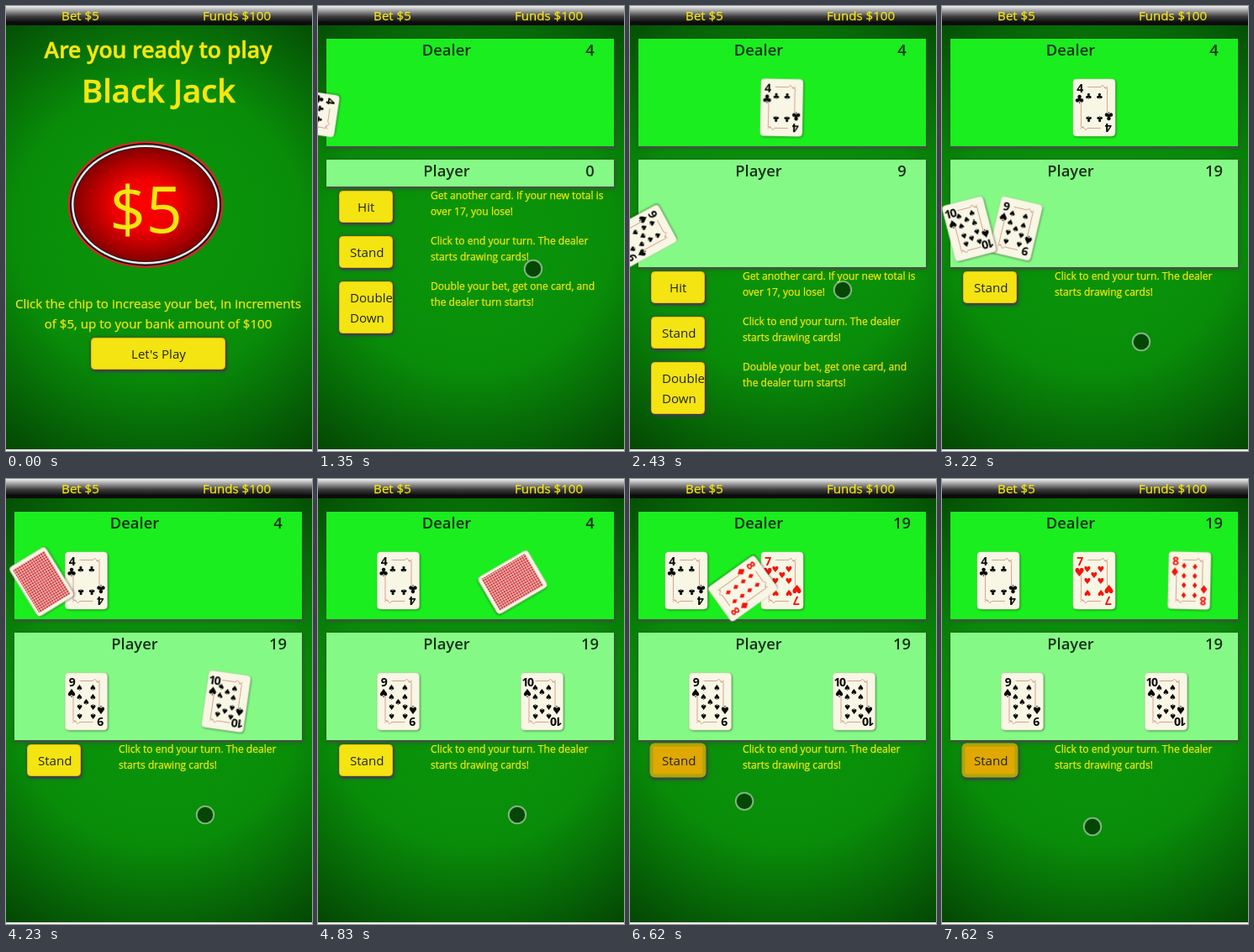
Write an HTML page that moves like this. It is 364x530 px and loops after 8000 ms.

```html
<!DOCTYPE html>
<html lang="en">
<head>
<meta charset="utf-8">
<title>Black Jack</title>
<style>
  html, body { margin: 0; width: 100%; height: 100%; overflow: hidden; }
  svg { display: block; font: 15.1px "Open Sans", "Noto Sans", sans-serif; fill: #f6e611; }
  .mid { text-anchor: middle; }
  .bright { stroke: #f6e611; stroke-width: .25; }
  .heading { font-weight: 600; text-anchor: middle; }
  .title { stroke: #f6e611; stroke-width: .6; }
  .panel { filter: drop-shadow(1px 2px 1px #4c4c4c) drop-shadow(0 0 3px #3338); }
  .panel-text { font-size: 18.4px; fill: #17301b; }
  .help { font-size: 12.1px; }
  .button rect { fill: #f4e411; stroke: #efb90c; filter: drop-shadow(1px 2px 1px #3a4247) drop-shadow(0 0 2px #3a4247); }
  .button text { fill: #212529; }
  .focused rect { fill: #e0a800; stroke: #aaa70b; stroke-width: 4; }
  .card { filter: drop-shadow(1px 1px 1px #0006); }
  .rank { font-weight: 700; font-size: 14px; letter-spacing: -1.5px; }
  .suit { font-family: "DejaVu Sans", sans-serif; }
  .rank, .suit { text-anchor: middle; dominant-baseline: central; }
</style>
</head>
<body>
<svg width="364" height="530" viewBox="0 0 364 530">
  <defs>
    <radialGradient id="felt" gradientUnits="userSpaceOnUse" cx="182" cy="265" r="321">
      <stop stop-color="#0a960a"/><stop offset=".53" stop-color="#098d09"/>
      <stop offset="1" stop-color="#044604"/>
    </radialGradient>
    <linearGradient id="bar" x2="0" y2="1">
      <stop stop-color="#f0f0f0"/><stop offset=".55" stop-color="#3c3c3c"/>
      <stop offset=".85" stop-color="#0c0c0c"/>
    </linearGradient>
    <radialGradient id="chip">
      <stop stop-color="#ff0000"/><stop offset=".45" stop-color="#f00000"/>
      <stop offset="1" stop-color="#880000"/>
    </radialGradient>
    <pattern id="lattice" width="3" height="3" patternUnits="userSpaceOnUse">
      <rect width="3" height="3" fill="#d2343e"/><path d="M0 .5H3M.5 0V3" stroke="#f3cfc4" stroke-width=".8"/>
    </pattern>
  </defs>
  <rect width="364" height="530" fill="url(#felt)"/>
  <rect width="364" height="23" fill="url(#bar)"/>
  <g class="mid bright">
    <text x="88.5" y="17">Bet $5</text>
    <text x="274.5" y="17">Funds $100</text>
  </g>

  <g id="intro">
    <text class="heading title" x="181" y="62" font-size="26.5">Are you ready to play</text>
    <text class="heading title" x="181.5" y="115" font-size="38.2">Black Jack</text>
    <g id="rings"></g>
    <text class="mid" x="166.5" y="269.5" font-size="76">$5</text>
    <g class="mid bright">
      <text x="181" y="360">Click the chip to increase your bet, in increments</text>
      <text x="181" y="384">of $5, up to your bank amount of $100</text>
    </g>
    <g class="button">
      <rect x="101.5" y="395.5" width="159" height="37" rx="4"/>
      <text class="mid" x="181.5" y="420">Let's Play</text>
    </g>
  </g>

  <g id="game">
    <rect class="panel" x="10" y="39" width="342" height="128" fill="#1aee1e"/>
    <rect class="panel" id="playerPanel" x="10" y="183" width="342" height="128" fill="#85f985"/>
    <g class="panel-text">
      <text class="heading" x="153" y="59">Dealer</text>
      <text class="heading" x="153" y="203">Player</text>
      <text class="heading" id="dealerScore" x="323.5" y="59"></text>
      <text class="heading" id="playerScore" x="323.5" y="203"></text>
    </g>
    <g id="rows"></g>
    <g id="cards"></g>
  </g>

  <circle id="cursor" r="10.2" stroke="#d0e0d0" stroke-opacity=".6" stroke-width="2"/>
  <rect y="528" width="364" height="2" fill="#eee"/>
</svg>
<script>
const LOOP = 8000, GAME_START = 880, STAND_AT = 6080, DEAL_MS = 1650;
const DEAL_SHIFT = 364, DEAL_SPIN = 540;
const $ = id => document.getElementById(id);
const show = (el, on) => el.setAttribute('display', on ? 'inline' : 'none');

// Chip: concentric ellipses, outermost first.
$('rings').innerHTML = [[92.3, '#e0232b'], [90, '#0a0a0a'], [88.4, '#888'], [87.6, '#f4f4f4'],
  [85.6, '#222'], [84.4, 'url(#chip)']]
  .map(([r, fill]) => `<ellipse cx="166" cy="236.5" rx="${r}" ry="${r - 17}" fill="${fill}"/>`).join('');

// Action rows: a button and two lines of help.
const rows = [
  { label: ['Hit'], x: 47, help: ['Get another card. If your new total is', 'over 17, you lose!'] },
  { label: ['Stand'], x: 38, help: ['Click to end your turn. The dealer', 'starts drawing cards!'] },
  { label: ['Double', 'Down'], x: 38, help: ['Double your bet, get one card, and', 'the dealer turn starts!'] }
];
const lines = (texts, x, y, step) =>
  texts.map((s, i) => `<text x="${x}" y="${y + i * step}">${s}</text>`).join('');
$('rows').innerHTML = rows.map(({ label, x, help }) => `<g>
  <g class="button"><rect x="25.5" y=".5" width="63" height="${13 + 24 * label.length}" rx="4"/>
    ${lines(label, x, 25, 24)}</g>
  <g class="help bright">${lines(help, 134, 10, 19)}</g></g>`).join('');
const rowEls = [...$('rows').children];
const standButton = rowEls[1].querySelector('.button');

// Cards are drawn around their own centre.
const pair = (x, ...ys) => ys.flatMap(y => [[-x, y], [x, y]]);
const pips = {
  4: pair(6.5, -13.5, 13.5),
  7: [...pair(8, -14, 0, 14), [0, -7]],
  8: pair(6.5, -17, -5.6, 5.6, 17),
  9: [...pair(8, -17, -6, 6, 17), [0, 0]],
  10: [...pair(8, -17, -6, 6, 17), [0, -11.5], [0, 11.5]]
};
const paper = '<rect x="-25" y="-34" width="50" height="68" rx="4" fill="#f8f6e4" stroke="#dcd9c4" stroke-width=".6"/>';
const back = paper + '<rect x="-22" y="-30" width="44" height="60" rx="1" fill="url(#lattice)"/>';

function face(rank, suit) {
  const color = '♥♦'.includes(suit) ? '#f5120c' : '#080808';
  const half = `<text class="rank" x="-17.5" y="-24">${rank}</text>
    <text class="suit" x="-17.5" y="-10" font-size="14">${suit}</text>
    <path d="M-8 -24.5H8M15.5 -20V6" stroke="#cf8f80" stroke-width=".8"/>
    <path d="M8 -24.5q2 -4 4 0t4 -1M12 -24q5 0 3.5 4" fill="none" stroke="#cf8f80" stroke-width=".8"/>`;
  const marks = pips[rank].map(([x, y]) =>
    `<text class="suit" font-size="9.8" transform="translate(${x} ${y})${y > 0 ? ' rotate(180)' : ''}">${suit}</text>`);
  return `${paper}<g fill="${color}">${half}<g transform="rotate(180)">${half}</g>${marks.join('')}</g>`;
}

const hands = [
  { y: 121, cards: [{ at: GAME_START, rank: 4, suit: '♣' }, { at: 3831, rank: 7, suit: '♥', hidden: true },
    { at: STAND_AT, rank: 8, suit: '♦' }] },
  { y: 265, cards: [{ at: 1902, rank: 9, suit: '♠' }, { at: 2844, rank: 10, suit: '♠' }] }
];
const [firstPlayerCard, secondPlayerCard] = hands[1].cards.map(c => c.at);
for (const hand of hands) for (const card of hand.cards) {
  $('cards').insertAdjacentHTML('beforeend', `<g class="card"><g>${face(card.rank, card.suit)}</g>
    ${card.hidden ? `<g>${back}</g>` : ''}</g>`);
  card.el = $('cards').lastElementChild;
}

// CSS "ease": cubic-bezier(.25, .1, .25, 1)
function ease(x) {
  if (x <= 0 || x >= 1) return x <= 0 ? 0 : 1;
  const bezier = (a, b, s) => 3 * a * s * (1 - s) ** 2 + 3 * b * s * s * (1 - s) + s ** 3;
  let low = 0, high = 1;
  for (let i = 0; i < 24; i++) {
    const s = (low + high) / 2;
    if (bezier(.25, .25, s) < x) low = s; else high = s;
  }
  return bezier(.1, 1, low);
}

const cursorPath = [
  [0, 308, 548], [69, 308, 548], [70, 290, 516], [560, 213, 427], [960, 213, 427], [1350, 256, 313],
  [2300, 256, 313], [2430, 253, 338], [2810, 241, 371], [3000, 237, 400], [5390, 237, 400],
  [5600, 82, 332], [5770, 61, 331], [6080, 61, 331], [6930, 179, 414], [LOOP, 179, 414]
];
function cursorAt(t) {
  const i = cursorPath.findIndex(p => p[0] > t);
  const [t0, x0, y0] = cursorPath[i - 1], [t1, x1, y1] = cursorPath[i];
  const k = (t - t0) / (t1 - t0);
  return [x0 + (x1 - x0) * k, y0 + (y1 - y0) * k];
}

function drawHand(hand, t) {
  const count = hand.cards.filter(c => t >= c.at).length;
  hand.cards.forEach(({ at, el, hidden }, i) => {
    show(el, t >= at);
    if (t < at) return;
    const left = 1 - ease((t - at) / DEAL_MS);
    const x = 10 + 342 * (i + .5) / count - DEAL_SHIFT * left;
    el.setAttribute('transform', `translate(${x} ${hand.y}) rotate(${DEAL_SPIN * left} 1 5.5)`);
    if (hidden) show(el.lastElementChild, t < STAND_AT);
  });
}

function draw(t) {
  const playing = t >= GAME_START, open = t >= firstPlayerCard, standOnly = t >= secondPlayerCard;
  show($('intro'), !playing);
  show($('game'), playing);
  $('playerPanel').setAttribute('height', open ? 128 : 32);
  $('dealerScore').textContent = t < STAND_AT ? 4 : 19;
  $('playerScore').textContent = standOnly ? 19 : open ? 9 : 0;
  rowEls.forEach((row, i) => {
    show(row, i === 1 || !standOnly);
    const y = standOnly ? 316 : (open ? 316 : 220) + 54 * i;
    row.setAttribute('transform', `translate(0 ${y})`);
  });
  standButton.classList.toggle('focused', t >= STAND_AT);
  hands.forEach(hand => drawHand(hand, t));

  const [x, y] = cursorAt(t);
  const pressed = t >= 730 && t < GAME_START || t >= 5920 && t < STAND_AT;
  $('cursor').setAttribute('transform', `translate(${x} ${y})`);
  $('cursor').setAttribute('fill', `rgba(0,0,0,${pressed ? .65 : .5})`);
}

const start = performance.now();
function tick() {
  draw((performance.now() - start) % LOOP);
  requestAnimationFrame(tick);
}
tick();
</script>
</body>
</html>
```
